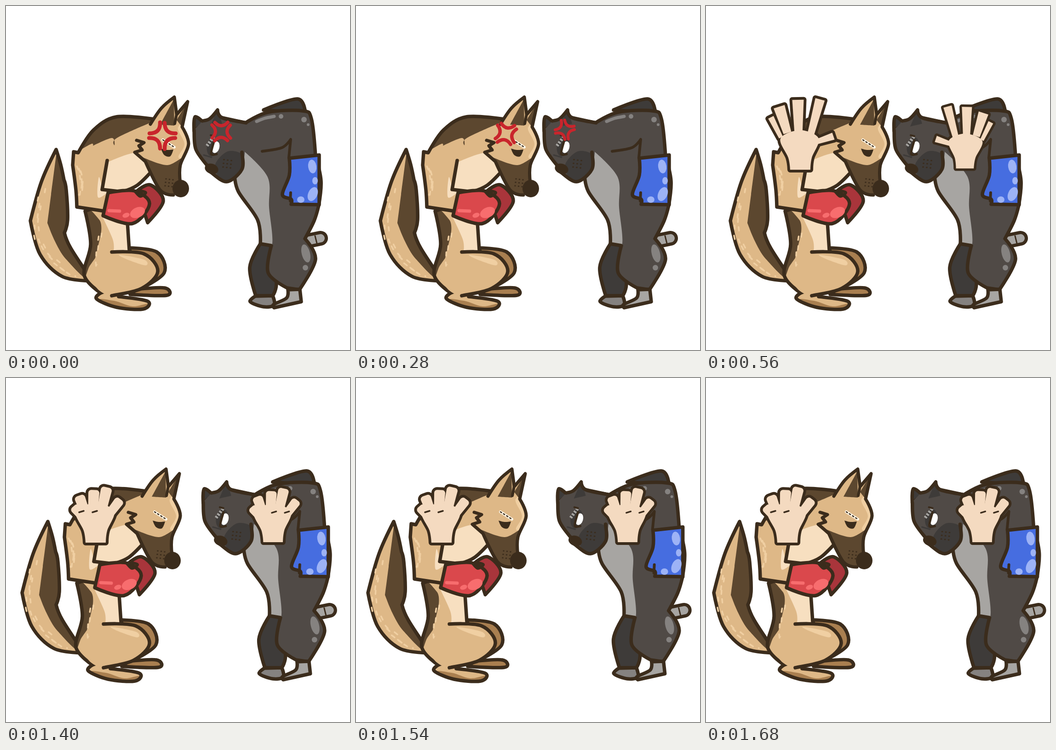
An HTML page that plays this animation: 748x748 px, repeating every 1820 ms.

```html
<!DOCTYPE html>
<html lang="en">
<head>
<meta charset="utf-8">
<title>Break it up</title>
<style>
html, body { margin: 0; width: 100%; height: 100%; overflow: hidden; background: #fff; }
svg { display: block; width: 100vw; height: 100vh; }
</style>
</head>
<body>
<svg id="stage" viewBox="0 0 748 748" stroke-linecap="round" stroke-linejoin="round"></svg>
<script>
const INK = '#3b2c1c', TAN = '#deb887', CREAM = '#f7dfc0', BROWN = '#5c472f', SHADE = '#a97f50',
  GLOW = '#f0cfa2', RED = '#da484c', DEEP = '#a9353b', PINK = '#f76d6e', COAL = '#504a46',
  DARK = '#3e3b39', GREY = '#a7a5a2', SHINE = '#858280', BLUE = '#466de0', SKY = '#9db3f6',
  SKIN = '#f4dac0', MARK = '#c9252c';
const stage = document.getElementById('stage');
let clips = 0, seed = 7;
const rand = () => (seed = seed * 16807 % 2147483647) / 2147483647;

function el(parent, tag, attrs = {}) {
  const n = document.createElementNS('http://www.w3.org/2000/svg', tag);
  for (const k in attrs) n.setAttribute(k, attrs[k]);
  parent.appendChild(n);
  return n;
}
const group = (parent, transform = '') => el(parent, 'g', { transform });

// Smooth curve through key points; "!" marks a sharp corner.
function curve(text, closed) {
  const p = text.trim().split(/\s+/).map(s => {
    const [x, y] = s.replace('!', '').split(',').map(Number);
    return { x, y, sharp: s.endsWith('!') };
  });
  const n = p.length, at = i => closed ? p[(i + n) % n] : p[Math.max(0, Math.min(n - 1, i))];
  const pull = (i, k) => {
    const a = at(i - 1), b = at(i), c = at(i + 1), s = b.sharp ? 0 : k / 6;
    return `${b.x + (c.x - a.x) * s} ${b.y + (c.y - a.y) * s}`;
  };
  let d = `M${p[0].x} ${p[0].y}`;
  for (let i = 0; i < (closed ? n : n - 1); i++)
    d += `C${pull(i, 1)} ${pull(i + 1, -1)} ${at(i + 1).x} ${at(i + 1).y}`;
  return d + (closed ? 'Z' : '');
}
const fill = (g, pts, color) => el(g, 'path', { d: curve(pts, true), fill: color });
const line = (g, pts, w = 7.5, color = INK) =>
  el(g, 'path', { d: curve(pts), fill: 'none', stroke: color, 'stroke-width': w });
const spot = (g, x, y, rx, ry, color, turn = 0) =>
  el(g, 'ellipse', { cx: x, cy: y, rx, ry, fill: color, transform: `rotate(${turn} ${x} ${y})` });

// Filled outline whose colour patches are clipped to it.
function part(g, pts, color, patches = [], w = 7.5) {
  const d = curve(pts, true), id = 'c' + clips++;
  el(g, 'path', { d, fill: color });
  el(el(g, 'clipPath', { id }), 'path', { d });
  const inner = el(g, 'g', { 'clip-path': `url(#${id})` });
  for (const [q, c] of patches) fill(inner, q, c);
  if (w) el(g, 'path', { d, fill: 'none', stroke: INK, 'stroke-width': w });
}

// Short hairs scattered around a curve, combed along it.
function fur(g, pts, count, spread) {
  const path = el(g, 'path', { d: curve(pts), fill: 'none' }), len = path.getTotalLength();
  for (let i = 0; i < count; i++) {
    const s = len * (i + rand()) / count, a = path.getPointAtLength(s);
    const b = path.getPointAtLength(Math.min(len, s + 8)), off = (rand() - .5) * spread;
    line(g, `${a.x + off},${a.y - off / 3} ${b.x + off},${b.y - off / 3}`, 3.5, GLOW);
  }
}
function freckles(g, x, y, rows, cols, gap, r) {
  for (let i = 0; i < rows * cols; i++) {
    const row = Math.floor(i / cols);
    spot(g, x + (i % cols) * gap - row, y + row * gap + (i % cols), r, r * .8, INK);
  }
}

function drawShepherd(g) {
  part(g, '109,312! 77,382 53,467! 74,540 122,588 188,598! 141,527 127,493! 134,465 131,400 126,378! 119,345', TAN, [
    ['109,325! 98,410 90,472! 99,495! 130,550 190,590 160,400', BROWN]]);
  fur(g, '78,400 67,480 88,540 150,588', 20, 18);

  part(g, '285,616! 345,613 350,629 270,627!', SHADE);
  part(g, '262,526! 328,535 344,580 290,616!', SHADE);
  part(g, '172,446! 184,518 170,585 206,624! 300,600 268,530! 264,470! 210,440', TAN, [
    ['160,440 203,465 206,498! 194,548! 182,565 165,590', BROWN],
    ['208,455! 232,507 234,532! 285,532 275,450', CREAM]]);
  fur(g, '206,485 199,545 206,600', 8, 10);

  part(g, '206,624! 197,637 240,655 298,659 308,642 245,632! 265,605', TAN, [
    ['195,640 235,641 275,653 315,648 310,680 200,680', SHADE]]);
  const thigh = '230,535! 300,539 330,577 295,614 230,630';
  fill(g, thigh + ' 192,605 200,560', TAN);
  fill(g, '247,541 301,552 303,564 263,551', GLOW);
  line(g, thigh);

  part(g, '147,317! 157,319! 190,270 240,241 322,246! 350,290 318,358! 285,390 252,404! 222,407! 214,446! 154,437! 152,400 145,346!', TAN, [
    ['150,320! 200,240 325,235 318,252! 241,287 236,303! 230,287 189,304! 185,300', BROWN],
    ['220,340! 290,318 335,350 255,410 210,402', CREAM],
    ['202,372 210,400! 222,404! 200,416', CREAM]]);
  fur(g, '156,345 165,372 162,410', 10, 14);
  line(g, '220,336! 209,399! 252,404!');

  part(g, '285,402! 314,389 342,424 308,471!', DEEP);
  part(g, '222,406! 279,402 312,430 275,473 211,456!', RED);
  spot(g, 286, 449, 17, 11, PINK, -24);
  spot(g, 261, 455, 8, 5, PINK, -20);
  line(g, '224,445 247,446', 7, PINK);
  line(g, '282,405 292,414 304,406 294,402', 6);

  const ear = '314,257! 338,222 366,198! 371,235!';
  const face = ' 372,235! 395,208! 383,263! 397,300 379,346 379,385!';
  const jaw = ' 364,411! 335,400 303,338! 280,318! 296,313! 289,304! 300,297! 284,292!';
  part(g, ear + face + jaw, TAN, [
    ['374,264 405,250 400,330 375,329 388,300', GLOW],
    ['295,328! 350,346 395,330 385,415 325,415', BROWN],
    ['335,258! 365,203! 366,260!', BROWN],
    ['371,248! 395,208! 382,262!', BROWN]], 0);
  [ear, face, jaw].forEach(s => line(g, s, 7));
  line(g, '371,235! 367,256!', 6);
  spot(g, 380, 397, 18, 19, INK);
  fill(g, '337,310! 350,313 364,312! 357,327 344,324', INK);
  line(g, '341,291 366,307', 6, '#fff6e6');
  line(g, '341,291 366,307', 2.5).setAttribute('stroke-dasharray', '3 5');
  freckles(g, 348, 376, 3, 3, 7.5, 1.8);
}

function drawBully(g) {
  for (const [w, c] of [[32, INK], [18, GREY]]) line(g, '660,510 684,505', w, c);
  line(g, '672,500 676,516', 3);
  part(g, '542,631! 531,643 560,654 583,650 580,630!', SHINE);
  part(g, '553,517! 530,568 543,630! 580,630! 588,600 575,522', DARK);
  part(g, '560,226! 634,202 651,233!', DARK);

  part(g, '470,243! 521,254! 570,231 645,228 664,245 673,326! 685,380 680,434! 670,467 650,506! 673,551 638,617! 611,613! 570,580 577,521! 553,517! 547,465 505,403 497,365!', COAL, [
    ['490,330! 511,310! 568,370 572,437 577,525 530,530 480,380', GREY]]);
  line(g, '545,251 563,244 583,240', 7, SHINE);
  for (const [x, y, r] of [[598, 240, 5], [648, 247, 6], [657, 258, 3], [651, 569, 6]]) spot(g, x, y, r, r, SHINE);
  spot(g, 652, 538, 9, 20, SHINE, -14);
  part(g, '613,617! 639,616! 642,643! 583,656! 582,649 610,635', GREY);
  line(g, '557,316 600,308 619,290! 615,330', 6);

  part(g, '616,331! 681,324! 681,432! 620,431! 620,420 601,410 616,368', BLUE);
  line(g, '618,424 619,406', 6);
  spot(g, 666, 349, 9, 15, SKY, -8);
  spot(g, 672, 380, 6, 8, SKY);
  spot(g, 667, 409, 10, 16, SKY, 24);
  spot(g, 641, 421, 8, 7, SKY);

  part(g, '409,272! 411,241 430,254!', DARK);
  part(g, '409,270! 430,248 444,244 460,226! 470,243 522,256! 515,345 480,383 440,350 412,310', COAL, [
    ['512,322 480,317 454,350 480,390 515,350', DARK],
    ['444,262! 460,224! 470,256!', DARK]], 0);
  line(g, '409,270 413,312 440,350');
  line(g, '427,250 443,245 460,226! 470,243 522,254');
  line(g, '513,318 513,355 480,382 446,362');
  spot(g, 447, 354, 15, 11, INK, 18);
  spot(g, 450, 306, 13, 21, DARK, 12);
  spot(g, 456, 307, 8, 13, '#fff', 15);
  line(g, '453,292 446,321 458,322', 5);
  line(g, '437,304 452,284', 7, GREY).setAttribute('style', 'stroke-dasharray:4 3;stroke-linecap:butt');
  line(g, '445,281 453,283', 4);
  line(g, '430,324 447,329', 3, DARK);
  freckles(g, 474, 334, 3, 3, 8, 2);
}

// Four bent strokes, a quarter turn apart.
function drawMark(g, x, y, size, turn) {
  const m = group(g), c = group(m, `translate(${x} ${y}) rotate(${turn}) scale(${size})`);
  for (let i = 0; i < 4; i++)
    el(c, 'path', { d: 'M-5 -29Q-4 -5 -28 -5', fill: 'none', stroke: MARK, 'stroke-width': 8.5, transform: `rotate(${i * 90})` });
  return { x, y, node: m };
}

// Fingers are [base x, base y, tip x, tip y, tip width] from the wrist; soft rounds the tips.
function drawHand(parent, place, fingers, soft) {
  const g = group(parent, place);
  const shapes = fingers.map(([x, y, u, v, w]) => {
    const len = Math.hypot(u - x, v - y), nx = (y - v) / len * w / 2, ny = (u - x) / len * w / 2;
    return [`M${x - nx * .7} ${y - ny * .7}L${u - nx} ${v - ny} ${u + nx} ${v + ny} ${x + nx * .7} ${y + ny * .7}Z`, soft];
  });
  shapes.push([curve('-22,-2! -26,-28 -43,-70 0,-88 40,-70 25,-28 22,-2!', true), 0]);
  for (const [color, rim] of [[INK, 12], [SKIN, 0]])
    for (const [d, r] of shapes) el(g, 'path', { d, fill: color, stroke: color, 'stroke-width': r + rim });
  return g;
}
const SPREAD = [[-42, -72, -64, -116, 13], [-28, -82, -46, -139, 25], [-4, -84, -5, -154, 25], [23, -80, 43, -155, 21], [36, -63, 72, -75, 16]];
const CUPPED = [[-30, -60, -44, -76, 8], [-23, -68, -34, -98, 10], [-6, -72, -4, -110, 11], [13, -72, 23, -116, 11], [28, -62, 50, -91, 8]];

const left = group(stage), right = group(stage);
drawShepherd(left);
drawBully(right);
const marks = [drawMark(left, 340, 282, 1, 0), drawMark(right, 468, 273, .84, 45)];
const open = group(stage), pushL = group(left), pushR = group(right);
drawHand(open, 'translate(205 358)', SPREAD, 0);
drawHand(open, 'translate(563 355) scale(-.88 .88)', SPREAD, 0);
const cupped = (parent, x, y, size, side) => {
  const g = drawHand(parent, `translate(${x} ${y}) scale(${size})`, CUPPED, 13);
  for (const k of [-31, -2]) line(g, `${k * side - 5},-68 ${k * side + 5},-71`, 3.5);
};
cupped(pushL, 213, 360, 1, 1);
cupped(pushR, 561, 359, .97, -1);

const STEP = 140, LOOP = 1820, CALM_AT = 420, OPEN_AT = 560, PUSH_AT = 1260;
const show = (node, on) => node.setAttribute('visibility', on ? 'visible' : 'hidden');

function draw(t) {
  const k = Math.floor(t / STEP), push = t >= PUSH_AT;
  marks.forEach(({ x, y, node }, i) => {
    show(node, t < CALM_AT);
    node.setAttribute('transform',
      `translate(${x - 7 * k} ${y - 2 * k}) rotate(${(i ? -28 : 28) * k}) scale(${1 - .06 * k}) translate(${-x} ${-y})`);
  });
  show(open, t >= OPEN_AT && !push);
  show(pushL, push);
  show(pushR, push);
  const steps = push ? k - PUSH_AT / STEP + 1 : 0;
  left.setAttribute('transform', `translate(${-9 * steps} 0)`);
  right.setAttribute('transform', `translate(${9.9 * steps} 0)`);
}

const start = performance.now();
function tick() {
  draw((performance.now() - start) % LOOP);
  requestAnimationFrame(tick);
}
tick();
</script>
</body>
</html>
```
